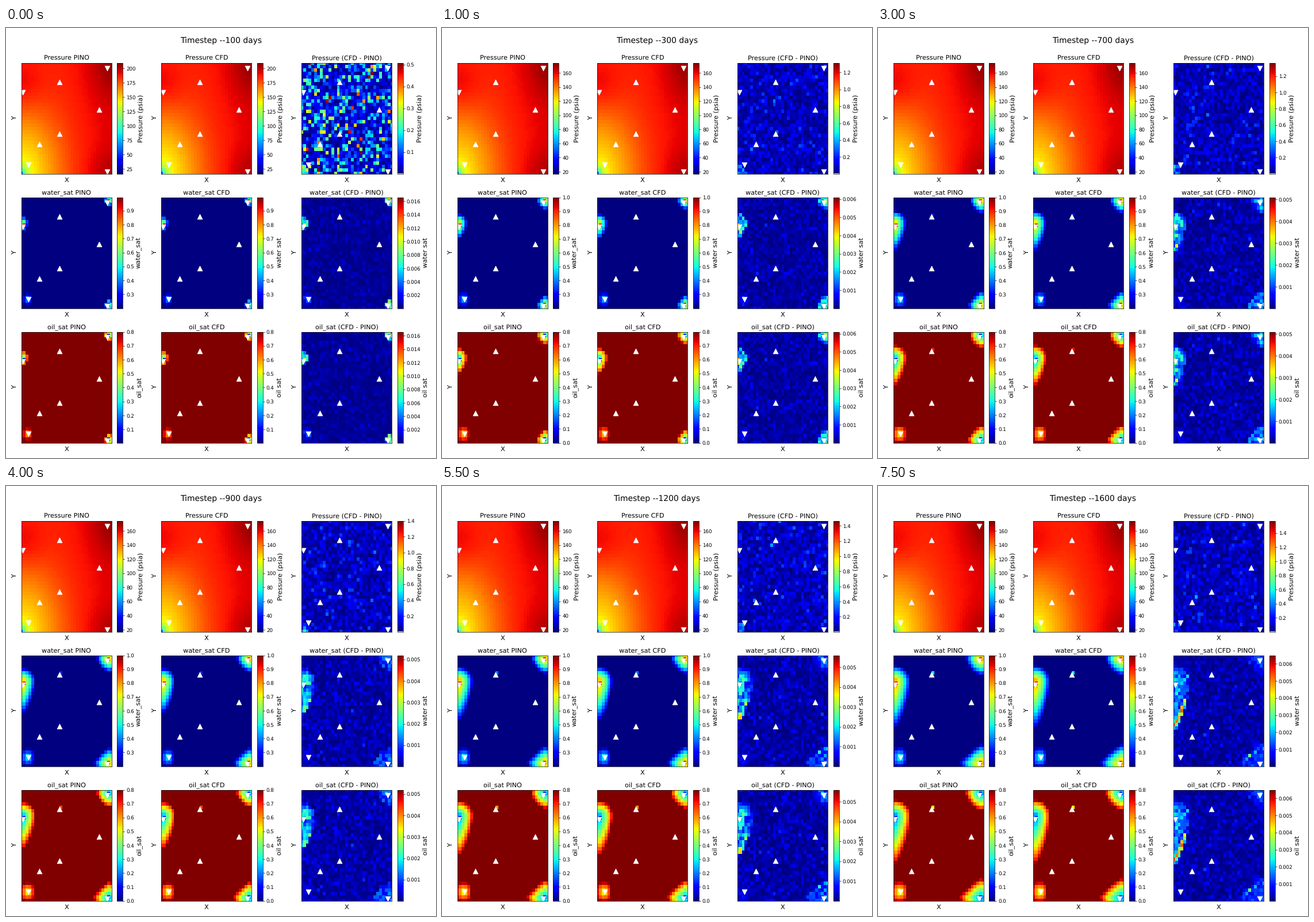
Animation, 748 px wide and 748 px high, one loop 8000 ms. Source, as a matplotlib script:

```python
import numpy as np
import matplotlib.pyplot as plt
from matplotlib.animation import FuncAnimation

plt.rcParams["text.hinting"] = "none"

SIZE = 748
N = 33
FRAMES = 16
LEFT, TOP, STEP_X, STEP_Y = 26.6, 60.5, 243.8, 234
W, H = 157, 193

INJECTORS = [(0.5, 23.5), (30.5, 30.5), (2.5, 2.5), (30.5, 0.5)]
PRODUCERS = [(13.5, 26.5), (27.5, 18.5), (13.5, 11.5), (6.5, 8.5)]

X, Y = np.meshgrid(np.arange(N), np.arange(N))
U, V = X / (N - 1), Y / (N - 1)


def bump(u, v, su, sv):
    return np.exp(-((U - u) / su) ** 2 - ((V - v) / sv) ** 2)


def pressure_level(first):
    """Pressure between 0 and 1: high at the injectors, low bottom left."""
    level = .872 + .045 * U ** 2
    level -= (.22 if first else .205) * bump(0, 0, .45, .55)
    level += .05 * bump(0, .8, .25, .22)
    level += .065 * bump(1, 1, .25, .3) + .045 * bump(1, 0, .25, .2)
    return level - .42 * np.exp(-np.hypot(X, Y) / 1.4)


def radius(cx, cy, rx, ry, p):
    return ((np.abs(X - cx) / rx) ** p + (np.abs(Y - cy) / ry) ** p) ** (1 / p)


def plumes(t):
    """Scaled distances from the injectors: 0 at the well, 1 at the front."""
    wide = 5.6 * t ** .36
    up = radius(.4, 24.5, wide, 4.6 * t ** .28, 2)
    down = radius(.4, 24.5, wide, 14 * t ** .63, 1.4)
    left = np.where(Y > 24.5, up, down)
    top = radius(31.3, 31.3, 5.8 * t ** .37, 5.1 * t ** .33, 1.5)
    bottom = radius(31.3, .7, 8 * t ** .52, 5.7 * t ** .3, 1.15)
    corner = radius(2.2, 2.5, 2.8 * t ** .2, 2.9 * t ** .18, 2.5)
    return left, top, bottom, corner


def body(r, power):
    return np.clip(1 - r, 0, 1) ** power


def water_field(t):
    *main, corner = plumes(t)
    s = .64 * t ** .08 * np.maximum.reduce([body(r, .75) for r in main])
    s = np.maximum(s, .33 * t ** .14 * body(corner, .75))
    for x, y in np.delete(INJECTORS, 2, axis=0):
        s[int(y + .5), int(x + .5)] = .72
    s[27, 14] = .34 * max(0, t - .19)
    return .2 + s


def saturation_error(t, rng):
    *main, corner = plumes(t)
    e = np.abs(rng.normal(0, .025 + .025 * min(1, 4 * t), (N, N)))
    mix = rng.uniform(.3, 1, (N, N))
    for r, late in zip(main, (.4, .18, .18)):
        gain = late + (1 - late) * np.exp(-3 * t)
        e += gain * body(r, .4) * mix
    e += .3 * np.exp(-2 * t) * body(corner, .5) * mix
    # The moving fronts of the lower plumes carry the largest error.
    for r, weight in ((main[0], .75), (main[2], .3)):
        ring = np.exp(-((r - .88) / .09) ** 2) * (Y < 20)
        e += weight * t ** .7 * ring * mix
    return np.clip(e, 0, .97)


def pressure_error(first, rng):
    noise, c = rng.normal(0, 1, (2, N, N))
    smooth = (c + np.roll(c, 1, 0) + np.roll(c, 1, 1)
              + np.roll(c, (1, 1), (0, 1))) / 2
    e = np.abs(.8 * noise + .6 * smooth)
    e = .22 * e ** 1.4 if first else .075 * e
    e[:3, :3] += .3 * rng.random((3, 3))
    return np.clip(e, 0, 1)


def state(i):
    """Per panel row: (field, low, high) and (error, low, high)."""
    first = i == 0
    t = (i + 1) / FRAMES
    rng = np.random.default_rng(i)
    lo, hi = (16.7, 209.6) if first else (17.2, 174.2)
    p_max = .508 if first else 1.3 + .275 * t ** 1.75
    s_max = np.interp(i, (0, 1, 2, 4, 8, 11, 15),
                      (.0166, .0093, .0061, .005, .0052, .0056, .0065))
    water = water_field(t)
    wet = .996 if first else 1
    p_err = (p_max * pressure_error(first, rng), .001 * p_max, p_max)
    s_err = (s_max * saturation_error(t, rng), .002 * s_max, s_max)
    return (((lo + (hi - lo) * pressure_level(first), lo, hi), p_err),
            ((water, .2004, wet), s_err),
            ((1 - water, 1 - wet, .8), s_err))


fig = plt.figure(figsize=(12, 12), dpi=SIZE / 12, facecolor="white")
heading = fig.suptitle("", fontsize=16)


def place(x, y, w, h):
    return fig.add_axes((x / SIZE, 1 - (y + h) / SIZE, w / SIZE, h / SIZE))


def panel(r, c):
    x, y = LEFT + c * STEP_X, TOP + r * STEP_Y
    name = ("Pressure", "water_sat", "oil_sat")[r]
    ax = place(x, y, W, H)
    mesh = ax.pcolormesh(X, Y, np.zeros((N, N)), cmap="jet",
                         shading="nearest", vmin=0, vmax=1)
    ax.set(xlim=(0, N - 1), ylim=(0, N - 1), xticks=[], yticks=[])
    ax.set_title(f"{name} {('PINO', 'CFD', '(CFD - PINO)')[c]}", fontsize=13)
    ax.set_xlabel("X", fontsize=13, labelpad=7.5)
    ax.set_ylabel("Y", fontsize=13, labelpad=7.5)
    for wells, marker in ((INJECTORS, "v"), (PRODUCERS, "^")):
        ax.scatter(*zip(*wells), s=100, marker=marker, color="white")
    bar = fig.colorbar(mesh, cax=place(x + W + 9.8, y, 9.65, H))
    unit = "Pressure (psia)" if r == 0 else name
    bar.set_label(unit if c == 0 else unit.replace("_", " "), fontsize=13)
    return mesh


meshes = [[panel(r, c) for c in range(3)] for r in range(3)]


def update(i):
    heading.set_text(f"Timestep --{100 * (i + 1)} days")
    for row, (value, error) in zip(meshes, state(i)):
        for mesh, (data, lo, hi) in zip(row, (value, value, error)):
            mesh.set_array(data)
            mesh.set_clim(lo, hi)
    return []


anim = FuncAnimation(fig, update, frames=FRAMES, interval=500, repeat=True,
                     repeat_delay=0, blit=False)
plt.show()
```
